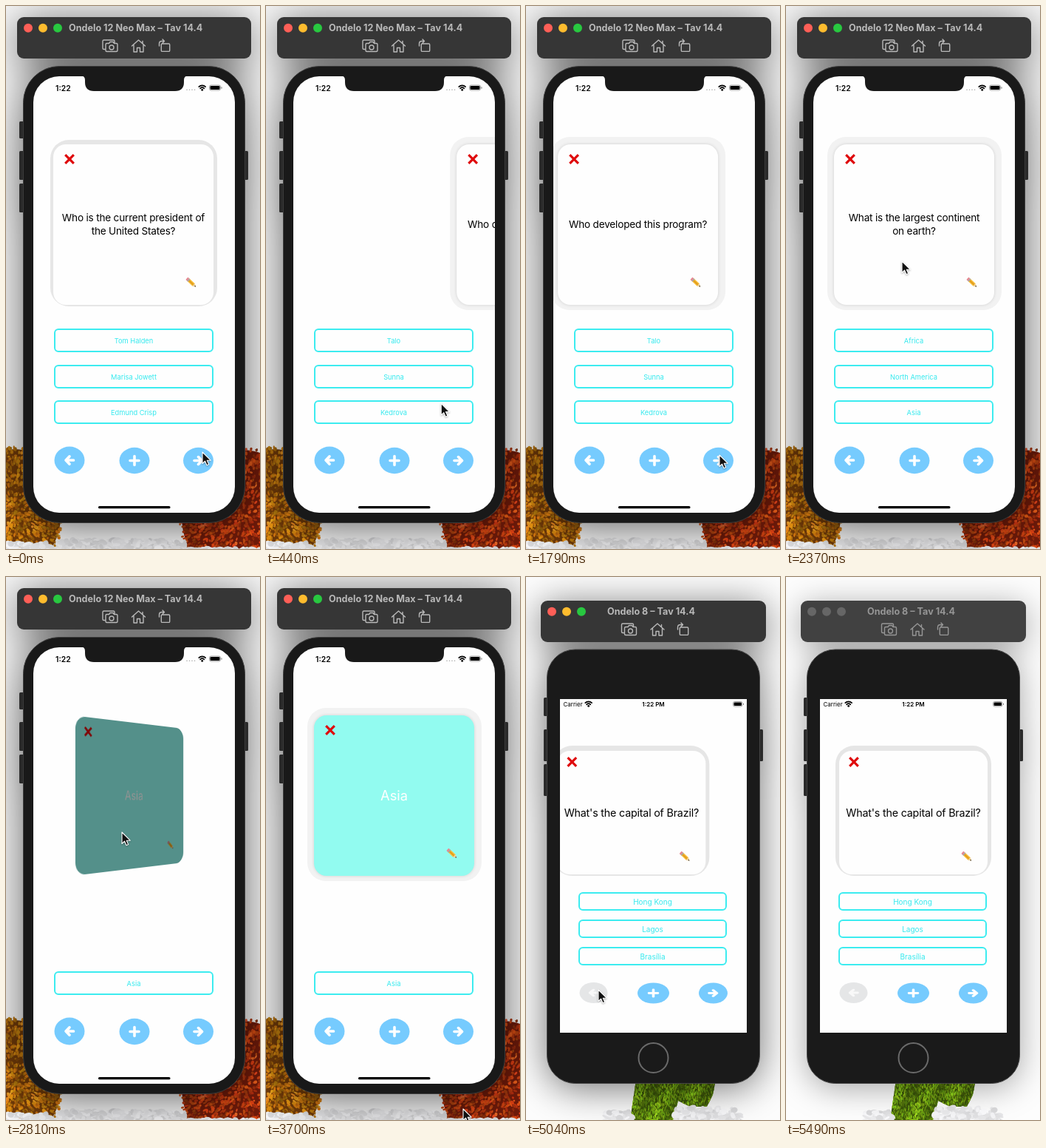
Write an HTML page with a canvas that moves like this. It is 344 by 734 pixels and loops after 5.59 s.

```html
<!DOCTYPE html>
<html lang="en">
<head>
<meta charset="utf-8">
<title>Quiz cards</title>
<style>
html, body { margin: 0; width: 100%; height: 100%; overflow: hidden; background: #fdfdfd; }
body { font-family: Inter, Roboto, sans-serif; }
#stage { position: absolute; left: 0; top: 0; width: 344px; height: 734px; overflow: hidden; }
.layer { position: absolute; left: 0; top: 0; width: 344px; height: 734px; overflow: hidden; }
.screen { background: #fefefe; }
.card, .answer { position: absolute; box-sizing: border-box; display: flex; align-items: center; justify-content: center; text-align: center; }
.card { border-radius: 17px; white-space: pre; }
.card::before { content: ""; position: absolute; z-index: -1; background: #e6e6e6; border-radius: 25px; inset: var(--ring); }
.card.soft::before { background: #f2f2f2; inset: -10px -10px -7px -9px; }
.card.turning::before { display: none; }
.face { position: absolute; inset: 0; border-radius: inherit; display: flex; align-items: center; justify-content: center; background: #fefefe; color: #000; }
.soft .face { box-shadow: 0 0 4px rgba(0, 0, 0, .14); }
.turning .face { box-shadow: none; }
.back .face { background: #92fbf0; color: #fff; font-size: 18.3px; letter-spacing: 0; }
.card svg { position: absolute; inset: 0; width: 100%; height: 100%; overflow: visible; }
.answer { border: 2px solid #3cecf0; border-radius: 6px; color: #35e9ee; }
.off { visibility: hidden; }
</style>
</head>
<body>
<div id="stage"></div>
<script>
const LOOP = 5590, TICK = 148.3;
const stage = document.getElementById('stage');

const add = (parent, cls, style = '', html = '') => {
  const e = document.createElement('div');
  e.className = cls;
  e.style.cssText = style;
  e.innerHTML = html;
  parent.append(e);
  return e;
};
const svg = (body, style = '') =>
  `<svg class="layer" style="${style}" viewBox="0 0 344 734">${body}</svg>`;
const rect = (x, y, x2, y2, r, fill, extra = '') =>
  `<rect x="${x}" y="${y}" width="${x2 - x}" height="${y2 - y}" rx="${r}" fill="${fill}" ${extra}/>`;
const text = (x, y, size, weight, str, extra = '') =>
  `<text x="${x}" y="${y}" font-size="${size}" font-weight="${weight}" ${extra}>${str}</text>`;
const at = (x, y, body) => `<g transform="translate(${x} ${y})">${body}</g>`;

function random(seed) {
  return () => (seed = (seed * 16807) % 2147483647) / 2147483647;
}

// ---- garden behind the simulator ----
function garden(parent, paint) {
  const c = document.createElement('canvas');
  c.className = 'layer';
  c.width = 344;
  c.height = 734;
  parent.append(c);
  paint(c.getContext('2d'));
}

function blob(g, x, y, rx, ry, fill, turn = 0) {
  g.fillStyle = fill;
  g.beginPath();
  g.ellipse(x, y, rx, ry, turn, 0, 7);
  g.fill();
}

function bush(g, cx, cy, rx, ry, hue, sat, seed) {
  const rnd = random(seed);
  blob(g, cx, cy, rx - 3, ry - 3, `hsl(${hue - 6} ${sat}% 24%)`);
  for (let i = 0; i < 1500; i++) {
    const a = rnd() * 6.283, d = Math.sqrt(rnd());
    const x = cx + Math.cos(a) * d * rx, y = cy + Math.sin(a) * d * ry;
    const light = 33 + 16 * rnd() + 9 * Math.sin(x / 6 + y / 11) * Math.cos(y / 8);
    blob(g, x, y, 1.2 + 2.2 * rnd(), 1 + 1.2 * rnd(), `hsl(${hue - 5 + 10 * rnd()} ${sat}% ${light}%)`, a);
  }
}

function snow(g, x1, x2, top, seed) {
  const rnd = random(seed);
  for (let i = 0; i < (x2 - x1) * 1.3; i++) {
    const v = 215 + 36 * rnd();
    blob(g, x1 + (x2 - x1) * rnd(), top + 4 + (734 - top) * rnd(),
      2 + 5 * rnd(), 1.5 + 3 * rnd(), `rgb(${v},${v},${v + 2})`, rnd() - .5);
  }
}

function moss(g) {
  const rnd = random(77);
  g.fillStyle = '#3a5409';
  g.beginPath();
  for (const p of [[149, 680], [257, 680], [253, 700], [245, 716], [222, 716], [206, 708], [199, 734], [141, 734]]) g.lineTo(...p);
  g.fill();
  g.save();
  g.clip();
  for (let i = 0; i < 1600; i++) {
    const x = 141 + 116 * rnd(), y = 680 + 54 * rnd();
    const light = 22 + 24 * rnd() + 7 * Math.sin(x / 6 + y / 12);
    g.strokeStyle = `hsl(${74 + 12 * rnd()} 78% ${light}%)`;
    g.lineWidth = 1.3;
    g.beginPath();
    g.moveTo(x, y);
    g.lineTo(x + 3 * (rnd() - .5), y + 3.5);
    g.stroke();
  }
  g.restore();
}

// ---- icons ----
const line = (d, w, color) => `<path d="${d}" fill="none" stroke="${color}" stroke-width="${w}" stroke-linecap="round" stroke-linejoin="round"/>`;
const ICONS = {
  camera: 'M-6 4.5h-2.5q-1.5 0-1.5-1.5v-9.5q0-1.5 1.5-1.5h13q1.5 0 1.5 1.5v1.5M-4.5-3.5h3l1.5-2h4l1.5 2h3q1.5 0 1.5 1.5v8q0 1.5-1.5 1.5h-13q-1.5 0-1.5-1.5v-8q0-1.5 1.5-1.5zM5 2a3 3 0 1 1-6 0a3 3 0 1 1 6 0',
  home: 'M-9 0L0-8L9 0M-6.5-1.5v9.5h4.5v-5.500h4v5.500h4.500v-9.500M5.500-6.500v3',
  turn: 'M-3.500-3h9q1.200 0 1.200 1.200v8q0 1.200-1.200 1.200h-9q-1.200 0-1.200-1.200v-8q0-1.200 1.200-1.200zM-7.500 0v-3q0-3.500 3.500-3.500h3M-3-9l2.500 2.500l-2.500 2.500',
  left: 'M5.500 0H-4.500M0-5L-5 0L0 5',
  right: 'M-5.500 0H4.500M0-5L5 0L0 5',
  plus: 'M-6 0H6M0-6V6'
};
const wifi = (x, y) => at(x, y,
  line('M-4.400-1.800a6.400 6.400 0 0 1 8.800 0M-2.600.400a3.900 3.900 0 0 1 5.200 0', 1.7, '#000') + '<circle cy="2.400" r="1.400"/>');
const battery = (x, y, w, h) =>
  rect(x, y, x + w, y + h, 2.2, 'none', 'stroke="#888" stroke-width=".8"') +
  rect(x + 1, y + 1, x + w - 1, y + h - 1, 1.3, '#000') + rect(x + w + 1, y + 2.3, x + w + 2, y + h - 2.3, .5, '#777');
const pencil = (x, y) => at(x, y,
  '<g transform="rotate(43)"><path d="M-6-2.300h10l4.200 2.300l-4.200 2.300h-10z" fill="#f7bd35"/>' +
  '<path d="M-5-.8h9v1.700h-9z" fill="#e09a1c"/><path d="M4-2.300l4.200 2.300l-4.200 2.300z" fill="#efd2a0"/>' +
  '<path d="M6.400-1l1.900 1l-1.900 1z" fill="#333"/><path d="M-6.300-2.300h2v4.600h-2z" fill="#a9a9a9"/>' +
  '<rect x="-8.500" y="-2.300" width="2.600" height="4.600" rx="1" fill="#e58a93"/></g>');
const cross = (x, y) => at(x, y, '<path d="M-5.800-5.800L5.800 5.800M5.800-5.800L-5.800 5.800" stroke="#df0a0c" stroke-width="3.200"/>');
const round = (x, y, rx, ry, icon, fill = '#76cbfe', ink = '#fff') =>
  at(x, y, `<ellipse rx="${rx}" ry="${ry}" fill="${fill}"/><g transform="scale(1 ${ry / 18})">${line(ICONS[icon], 3.600, ink)}</g>`);

// ---- one simulator window ----
function bar(x, y, x2, title, titleX, icons, live) {
  const lamps = live ? ['#ff5f57', '#febc2e', '#28c840'] : ['#666', '#666', '#666'];
  const ink = live ? '#b9b9b9' : '#969696';
  return rect(x, y, x2, y + 56, 9, live ? '#363636' : '#414141') +
    lamps.map((c, i) => `<circle cx="${x + 15 + 20 * i}" cy="${y + 14.8}" r="6" fill="${c}"/>`).join('') +
    text(titleX, y + 19, 12.6, 700, title, `fill="${ink}"`) +
    ['camera', 'home', 'turn'].map((n, i) => at(icons[i], y + 39, line(ICONS[n], 1.4, ink))).join('');
}

const keys = list => list.map(([x, y, y2]) => rect(x, y, x + 7, y2, 1.5, '#2a2a2a')).join('');
const shade = (blur, alpha) => `filter:drop-shadow(0 6px ${blur}px rgba(0,0,0,${alpha}))`;

function simulator(o) {
  const root = add(stage, 'layer');
  garden(root, o.paint);
  const frame = add(root, 'layer', '', o.frame);
  const screen = add(root, 'layer screen', `clip-path:${o.clip}`);
  const [x, y, w, h] = o.card;
  const card = add(screen, 'card', `left:${x}px;top:${y}px;width:${w}px;height:${h}px;--ring:${o.ring};z-index:0;font-size:${o.size}px;line-height:17.5px;letter-spacing:-.2px`);
  const face = add(card, 'face');
  card.insertAdjacentHTML('beforeend', `<svg>${cross(o.cross[0] - x, o.cross[1] - y)}${pencil(o.pencil[0] - x, o.pencil[1] - y)}</svg>`);
  const answers = o.rows.map(top => add(screen, 'answer',
    `left:${o.rowX}px;top:${top}px;width:${o.rowW}px;height:${o.rowH}px;font-size:${o.rowSize}px`));
  add(root, 'layer', '', svg(o.over));
  return { root, frame, card, face, answers };
}

const big = simulator({
  paint(g) {
    g.fillStyle = '#fbfbfb';
    g.fillRect(0, 0, 344, 734);
    snow(g, -5, 349, 720, 5);
    bush(g, 12, 682, 66, 86, 35, 86, 21);
    bush(g, 320, 690, 85, 93, 16, 84, 43);
    snow(g, -5, 349, 730, 9);
    snow(g, -5, 60, 722, 12);
    snow(g, 70, 240, 718, 15);
  },
  frame: svg(keys([[18, 156, 179], [18, 196, 235], [18, 240, 279], [321, 196, 235]]) +
    rect(23.5, 81.5, 323.5, 698.5, 49, '#191919', 'stroke="#3a3a3a"') +
    bar(15, 15, 332, 'Ondelo 12 Neo Max – Tav 14.4', 85, [141, 179.5, 215], true), shade(30, .62)),
  clip: 'inset(95px 34px 49px 37px round 35px)',
  card: [65, 187, 217, 217],
  ring: '-6px -5px -2px -4px',
  size: 13.6,
  cross: [87, 207], pencil: [252, 374],
  rows: [436, 485, 533], rowX: 65, rowW: 216, rowH: 32, rowSize: 9.3,
  over: '<path d="M102 94h144q-5 1-5 6v3q0 12-12 12h-110q-12 0-12-12v-3q0-5-5-6z" fill="#191919"/>' +
    text(67, 114.5, 10.4, 600, '1:22') +
    [245, 248.5, 252, 255.5].map(x => `<circle cx="${x}" cy="113.3" r=".8" fill="#aaa"/>`).join('') +
    wifi(265.7, 111) + battery(275.5, 107, 15, 7) +
    round(86, 614, 20.5, 18.5, 'left') + round(174, 614.5, 20.5, 17.7, 'plus') + round(260.5, 614.5, 20.5, 17.7, 'right') +
    rect(125, 676, 222.5, 679.3, 1.6, '#000')
});

const smallFrame = live => svg(
  keys([[24, 163, 188], [24, 206, 249], [24, 253, 296], [314, 206, 249]]) +
  rect(28.5, 98, 316.5, 684.5, 38, '#1a1a1a', 'stroke="#444"') +
  '<circle cx="172.5" cy="650" r="20" fill="none" stroke="#6a6a6a" stroke-width="2"/>' +
  bar(20, 32, 325, 'Ondelo 8 – Tav 14.4', 110, [139.5, 178, 213], live),
  live ? shade(26, .55) : shade(22, .34));
const smallLooks = [smallFrame(true), smallFrame(false)];

const small = simulator({
  paint(g) {
    g.fillStyle = '#fdfdfd';
    g.fillRect(0, 0, 344, 734);
    snow(g, 112, 290, 722, 31);
    moss(g);
    snow(g, 202, 285, 714, 8);
    snow(g, 108, 142, 719, 12);
  },
  frame: '',
  clip: 'inset(165px 45px 118px 46px)',
  card: [72, 235, 201, 167],
  ring: '-7px -5px -2px',
  size: 14.3,
  cross: [92, 250], pencil: [245, 378],
  rows: [426, 463, 500], rowX: 71, rowW: 201, rowH: 25, rowSize: 10,
  over: text(50.5, 175, 8, 400, 'Carrier') + wifi(84.7, 172) +
    text(172.5, 175, 8, 600, '1:22 PM', 'text-anchor="middle"') + battery(280.5, 168.5, 12.5, 6.5) +
    round(91.5, 562, 19, 14, 'left', '#e5e6e7', '#f8f8f8') + round(172.5, 562.5, 21.5, 14, 'plus') + round(253.5, 562.5, 19.5, 14, 'right')
});

const pointer = add(stage, 'layer', '', svg('<path d="M0 0V15.5L3.6 12.2L6 17.8L8.7 16.6L6.3 11.2H11.2Z" fill="#111" stroke="#fff" stroke-width="1.1" stroke-linejoin="round"/>',
  'overflow:visible;filter:drop-shadow(0 1px 1px rgba(0,0,0,.3))'));
pointer.style.overflow = 'visible';

// ---- story ----
const QUIZ = {
  leader: ['Who is the current president of\nthe United States?', ['Tom Halden', 'Marisa Jowett', 'Edmund Crisp'], 0],
  author: ['Who developed this program?', ['Talo', 'Sunna', 'Kedrova'], 0],
  land: ['What is the largest continent\non earth?', ['Africa', 'North America', 'Asia'], 2],
  hello: ['Hello', ['re', 're', 'Hi'], 2],
  city: ["What's the capital of Brazil?", ['Hong Kong', 'Lagos', 'Brasília'], 2]
};
// start, direction, travel, next question
const SWIPES = [[-22, -1, 320, 'author'], [1675, -1, 320, 'land'], [4437, 1, 297, 'city']];
// start, whether the answer side comes up
const FLIPS = [[790, true], [1240, false], [2500, true]];
const FLIP_MS = 416, OUT_MS = 400, IN_MS = 300;
// tick, x, y
const PATH = [[0, 266, 603], [2, 266, 603], [5, 155, 350], [7, 146, 348], [9, 146, 348], [11, 258, 612],
  [12, 262, 607], [14, 262, 605], [16, 157, 345], [20, 157, 345], [22, 288, 600], [24, 253, 614],
  [25, 267, 719], [26, 270, 724], [28, 268, 727], [29, 270, 760], [30, 270, 760], [31, 98, 558],
  [34, 98, 558], [35, 98, -40], [40, 98, -40]];

function pointerAt(k) {
  const i = PATH.findIndex((p, n) => n && k <= p[0]);
  const [a, x, y] = PATH[i - 1], [b, x2, y2] = PATH[i];
  const p = (k - a) / (b - a), e = p * p * (3 - 2 * p);
  return [x + (x2 - x) * e, y + (y2 - y) * e];
}

function swipeAt(t, first, list) {
  let name = first, dx = 0;
  for (const [start, dir, span, next] of list) {
    const dt = t - start;
    if (dt < 0) continue;
    if (dt < OUT_MS) dx = dir * span * (dt / OUT_MS) ** 2;
    else {
      name = next;
      dx = -dir * span * Math.max(0, 1 - (dt - OUT_MS) / IN_MS) ** 2;
    }
  }
  return [name, dx];
}

function flipAt(t) {
  let open = false, back = false, angle = 0;
  for (const [start, up] of FLIPS) {
    if (t < start) continue;
    const p = Math.min(1, (t - start) / FLIP_MS), sign = up ? 1 : -1;
    open = up;
    back = p < .5 ? !up : up;
    angle = sign * (p < .5 ? -180 * p : 180 - 180 * p);
  }
  return [open, back, angle];
}

function show(sim, name, dx, open, back, angle) {
  const [question, answers, right] = QUIZ[name];
  const s = Math.sin(Math.abs(angle) * Math.PI / 180), turning = s > .001;
  sim.face.textContent = back ? answers[right] : question;
  sim.card.classList.toggle('back', back);
  sim.card.classList.toggle('turning', turning);
  sim.card.classList.toggle('soft', name === 'author' || name === 'land');
  sim.card.style.transform = `translateX(${dx}px)` + (turning ? ` perspective(756px) rotateY(${angle}deg) scale(${1 - .137 * s})` : '');
  sim.card.style.filter = turning ? `brightness(${1 - .63 * s})` : 'none';
  sim.answers.forEach((a, i) => {
    a.textContent = answers[i];
    a.classList.toggle('off', open && i !== right);
  });
}

let last = -1;
function draw(now) {
  const k = Math.floor((now % LOOP + 12) / TICK);
  if (k === last) return;
  last = k;
  const t = k * TICK, second = k >= 31;
  big.root.style.display = second ? 'none' : '';
  small.root.style.display = second ? '' : 'none';
  if (second) {
    small.frame.innerHTML = smallLooks[k >= 37 ? 1 : 0];
    show(small, ...swipeAt(t, 'hello', SWIPES.slice(2)), false, false, 0);
  } else {
    show(big, ...swipeAt(t, 'leader', SWIPES.slice(0, 2)), ...flipAt(t));
  }
  const [x, y] = pointerAt(k);
  pointer.style.transform = `translate(${x}px,${y}px)`;
}

let origin = null;
function loop(now) {
  if (origin === null) origin = now;
  draw(now - origin);
  requestAnimationFrame(loop);
}
draw(0);
requestAnimationFrame(loop);
</script>
</body>
</html>
```
